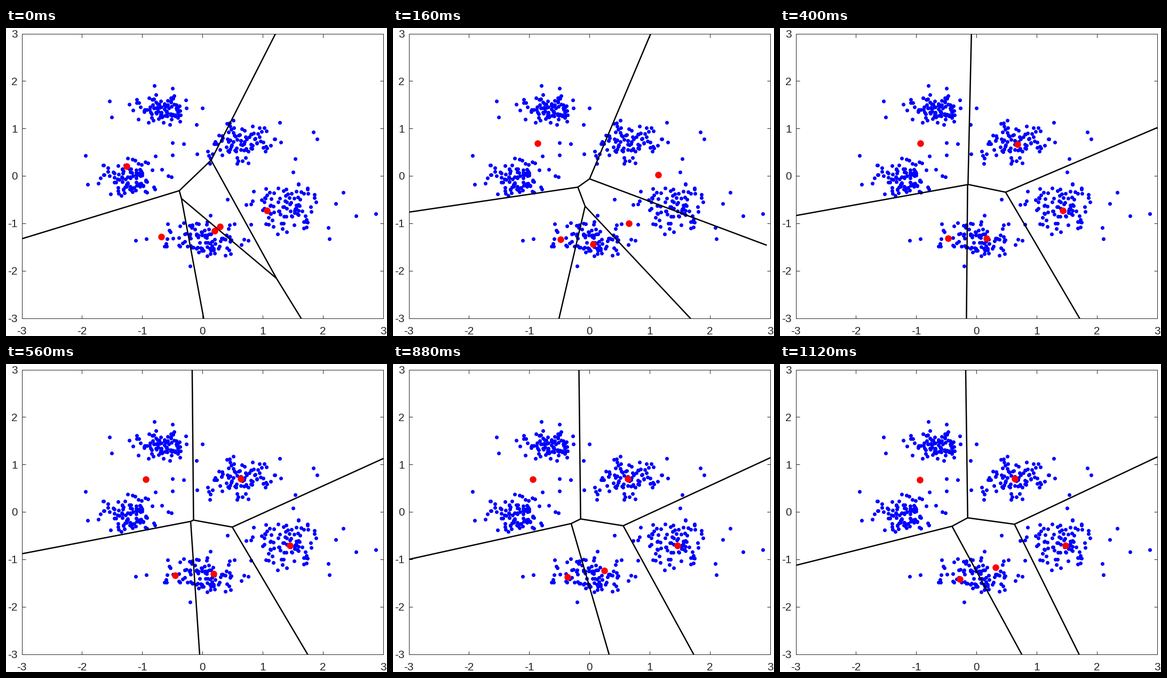
Recreate the animation shown at these times as a matplotlib script. Size 714 by 577 pixels, loop 1280 ms.

```python
from itertools import combinations

import matplotlib.pyplot as plt
import numpy as np
from matplotlib.animation import FuncAnimation
from matplotlib.collections import LineCollection

W, H, DPI = 714, 577, 64
LEFT, TOP, BOX_W, BOX_H = 29.5, 10.5, 677, 533
LIMIT = 3
REACH = 3.26          # length of the open Voronoi rays
STEPS, FRAMES, INTERVAL = 14, 16, 80
INK = "#262626"

plt.rcParams["font.family"] = "Liberation Sans"


def pt(px):
    return px * 72 / DPI


def to_data(px):
    """Stage pixels to plot coordinates."""
    px = np.asarray(px, float).reshape(-1, 2)
    centre = (LEFT + BOX_W / 2, TOP + BOX_H / 2)
    return (px - centre) / (BOX_W / 6, -BOX_H / 6)


# (centre, spread, stragglers), all in pixels
CLUSTERS = [
    ((292, 152), (28, 14),
     [194, 137, 198, 167, 278, 108, 312, 113, 368, 150, 357, 181]),
    ((234, 279), (35, 16),
     [149, 239, 153, 293, 312, 238, 280, 240, 310, 279]),
    ((435, 214), (36, 18),
     [312, 215, 333, 217, 358, 236, 382, 254, 513, 177, 576, 195, 583, 208,
      542, 245]),
    ((523, 340), (35, 24),
     [693, 348, 656, 352, 632, 308, 618, 329, 604, 374, 606, 395, 538, 270,
      415, 321]),
    ((369, 394), (39, 19),
     [243, 398, 263, 395, 345, 446]),
]


def scatter_points(size=100):
    rng = np.random.default_rng(12)
    groups = []
    for centre, spread, far in CLUSTERS:
        far = np.reshape(far, (-1, 2))
        z = rng.normal(size=(4 * size, 2))
        z = z[np.hypot(*z.T) < 2.3][:size - len(far)]
        groups += [far, centre + z * spread]
    return to_data(np.vstack(groups))


# step, easing power on the way there, the five means in pixels
KEYS = [
    (0, 1, [226, 259, 291, 391, 391, 379.5, 400.9, 372.2, 489, 342]),
    (1, 1, [277, 215, 314, 395, 382, 404, 421, 368, 499, 282]),
    (2, 1, [271, 216, 314, 396.2, 375, 405, 442, 366, 497, 275]),
    (4, 0.62, [266, 215, 311, 390.5, 383, 397, 527, 345.5, 454, 224]),
    (7, 0.4, [261.5, 216, 317, 395.5, 388.5, 392.5, 531.5, 340, 440, 215]),
    (14, 1.3, [261.5, 216.5, 336.8, 403, 403.5, 380.5, 535, 340, 440, 215]),
]


def means_at(step):
    for (s0, _, p0), (s1, power, p1) in zip(KEYS, KEYS[1:]):
        if step <= s1:
            u = ((step - s0) / (s1 - s0)) ** power
            return to_data(np.array(p0) * (1 - u) + np.array(p1) * u)


def voronoi_edges(sites):
    """Clip each pair's bisector by the half-planes of the other sites."""
    edges = []
    for i, j in combinations(range(len(sites)), 2):
        a, b = sites[i], sites[j]
        mid = (a + b) / 2
        along = np.array([a[1] - b[1], b[0] - a[0]])
        along /= np.hypot(*along)
        lo, hi = -np.inf, np.inf
        for k, p in enumerate(sites):
            if k in (i, j):
                continue
            slope = along @ (p - a)
            cut = ((p @ p - a @ a) / 2 - mid @ (p - a)) / slope
            if slope > 0:
                hi = min(hi, cut)
            else:
                lo = max(lo, cut)
        if lo < hi:
            if np.isinf(lo):
                lo = hi - REACH
            elif np.isinf(hi):
                hi = lo + REACH
            edges.append([mid + lo * along, mid + hi * along])
    return edges


fig = plt.figure(figsize=(W / DPI, H / DPI), dpi=DPI, facecolor="white")
ax = fig.add_axes([LEFT / W, 1 - (TOP + BOX_H) / H, BOX_W / W, BOX_H / H])
ax.set(xlim=(-LIMIT, LIMIT), ylim=(-LIMIT, LIMIT))
ticks = range(-LIMIT, LIMIT + 1)
ax.set_xticks(ticks)
ax.set_yticks(ticks)
ax.tick_params(direction="in", length=pt(6.5), width=pt(1), color=INK,
               top=True, right=True, labelbottom=False, labelleft=False)
for spine in ax.spines.values():
    spine.set(linewidth=pt(1), edgecolor=INK)

label = dict(textcoords="offset pixels", color=INK, fontsize=pt(20.8),
             va="baseline", annotation_clip=False)
for v in ticks:
    ax.annotate(str(v), (v, -LIMIT), xytext=(0, -30.5), ha="center", **label)
    ax.annotate(str(v), (-LIMIT, v), xytext=(-8, -7.5), ha="right", **label)

ax.plot(*scatter_points().T, "o", color="#0000ff", ms=pt(7), mew=0, zorder=2)
borders = LineCollection([], colors="black", linewidths=pt(2.5), zorder=3)
ax.add_collection(borders, autolim=False)
dots, = ax.plot([], [], "o", color="#ff0000", ms=pt(12.5), mew=0, zorder=4)


def draw(frame):
    sites = means_at(min(frame, STEPS))
    borders.set_segments(voronoi_edges(sites))
    dots.set_data(*sites.T)
    return borders, dots


anim = FuncAnimation(fig, draw, frames=FRAMES, interval=INTERVAL,
                     repeat=True, repeat_delay=0)
plt.show()
```
